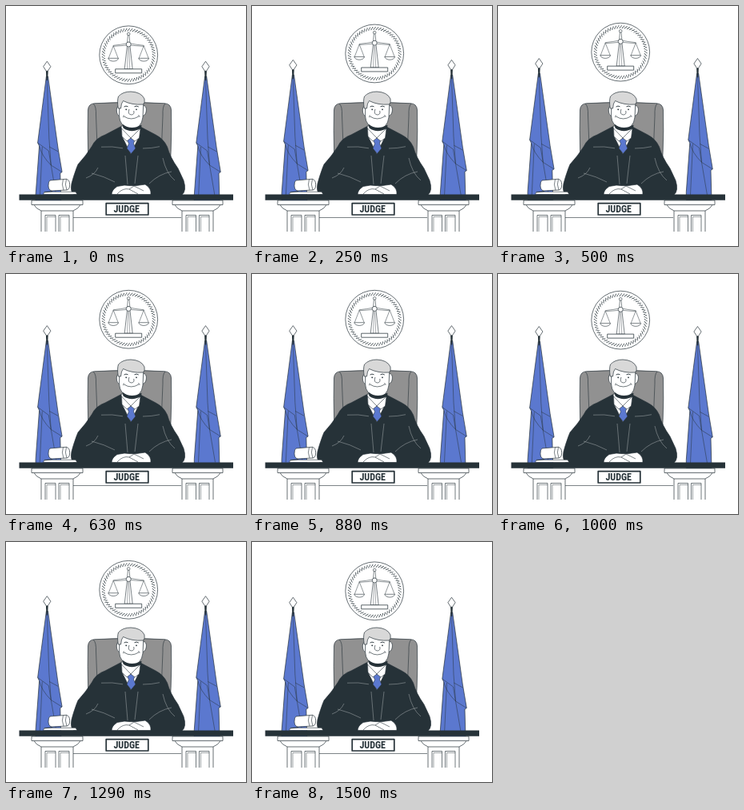
Animation, 300 px wide and 300 px high, one loop 1.54 s. Source, as an HTML page with a canvas:

```html
<!DOCTYPE html>
<html lang="en">
<head>
<meta charset="utf-8">
<title>Judge</title>
<style>
html, body { margin: 0; width: 100%; height: 100%; overflow: hidden; background: #fff; }
canvas { display: block; width: 100vw; height: 100vh; }
</style>
</head>
<body>
<canvas id="stage"></canvas>
<script>
const canvas = document.getElementById('stage');
const ctx = canvas.getContext('2d');
const LOOP = 1540, FPS = 24, CYCLE = 1.5, RISE = 5.5;
const INK = '#263238', BLUE = '#5b78cf', GREY = '#919191', HAIR = '#d8d8d8', WHITE = '#fff';

function shape(d, fill, stroke = INK, width = 0.7) {
  const path = new Path2D(d);
  if (fill) { ctx.fillStyle = fill; ctx.fill(path); }
  if (stroke) { ctx.strokeStyle = stroke; ctx.lineWidth = width; ctx.stroke(path); }
}
const line = (d, color, width) => shape(d, null, color, width);
const box = (x, y, w, h, fill = WHITE, stroke = INK, width = 0.7) =>
  shape(`M${x} ${y}h${w}v${h}h${-w}z`, fill, stroke, width);

function disc(x, y, r, fill, stroke = INK, width = 0.7) {
  ctx.beginPath();
  ctx.arc(x, y, r, 0, Math.PI * 2);
  if (fill) { ctx.fillStyle = fill; ctx.fill(); }
  if (stroke) { ctx.strokeStyle = stroke; ctx.lineWidth = width; ctx.stroke(); }
}

function at(x, y, draw) {
  ctx.save();
  ctx.translate(x, y);
  draw();
  ctx.restore();
}

function pan(x) {
  at(x, 0, () => {
    line('M0 -11.5L-6 4M0 -11.5L6 4', INK, 0.5);
    shape('M-6.5 4H6.5C5 9 -5 9 -6.5 4Z', WHITE, INK, 0.6);
  });
}

// Emblem, centred on its own origin
function emblem() {
  disc(0, 0, 36.4, WHITE);
  const beads = 60;
  for (let i = 0; i < beads; i++) {
    ctx.save();
    ctx.rotate(i * Math.PI * 2 / beads);
    line('M29.6 -1.2Q31 -1.2 31.5 0Q32 1.2 33.4 1.2', INK, 0.8);
    ctx.restore();
  }
  pan(-19);
  pan(19);
  shape('M-19 -12Q-9 -13 -2 -14.5H2Q9 -13 19 -12V-11Q9 -11.5 0 -12.5Q-9 -11.5 -19 -11Z', WHITE, INK, 0.5);
  shape('M-1.8 -11L-5 17.5H5L1.8 -11Z', WHITE, INK, 0.6);
  line('M-.6 -10L-1.6 17.5M.6 -10L1.6 17.5', INK, 0.4);
  box(-16.5, 17.5, 33, 5, WHITE, INK, 0.75);
  shape('M-.8 -25L-1.6 -16H1.6L.8 -25Z', WHITE, INK, 0.55);
  disc(0, -26.3, 1.8, WHITE, INK, 0.6);
  disc(0, -13.3, 3, WHITE, INK, 0.7);
}

// Flag with its pole at x = 0
function flag() {
  shape('M-.9 88L-11.7 171L-9.7 175L-14.2 236V246H17.5L16.5 209L18.8 207.5L13.8 178L1.2 88Z', BLUE);
  line('M0 92L2.5 165L5 199L18.6 207.5M-11.7 171L2 181L5 199M2.8 176L14 182'
    + 'M-9.7 175Q-7 187 5 199M5 199L12 240M-6 176L-9 240', INK, 0.5);
  shape('M-1.4 81H1.4L.8 93H-.8Z', INK, null);
  shape('M0 69.2L4.6 75.7L1 81.3H-1L-4.6 75.7Z', WHITE);
}

function chair() {
  shape('M106 238Q101 180 102.5 130Q103 122 111 121.7Q154 118.8 198 121.7Q206 122 206.5 130Q208 181 202 238Z', GREY);
  line('M109 122Q113 125 112.5 137L114 175M199 122Q195.5 125 196 137L194.5 175', INK, 0.6);
}

function head() {
  shape('M142 125C137 123.5 137 137 142.5 138ZM171 125C177 122.5 177 136.5 170.5 137.5Z', WHITE);
  shape('M142 117L141.5 137Q142 151 156 154.5Q169.5 153 171 139L172 118Q157 106 142 117Z', WHITE);
  shape('M140.2 128Q138.8 118 140.5 113Q146 107 156 107Q169 107.5 173 116Q174 121 171.5 123Q157 124 146.5 118.5Q144 121 143.5 128Z', HAIR);
  line('M147.5 126Q150 124.2 152.5 125.8M160.5 125.8Q163 124.2 165.8 126', INK, 0.9);
  disc(150.2, 129.3, 0.9, INK, null);
  disc(163, 129.3, 0.9, INK, null);
  line('M154 129Q151.5 135.5 156.8 136Q161 135.7 159.7 131M147.5 138Q156.5 144 166.2 137.8M147.3 136.5L146.6 139.2M165.6 136.2L167.2 138.8', INK, 0.65);
}

function judge() {
  shape('M143 151L124 161Q112 165 107 176Q100 187 90 198L88 203Q84 214 82 222Q80 232 85 236H220Q226 231 222 218L215 203Q205 189 201.5 176Q197 166 187 161L168 151Z', INK);
  shape('M144 150L145 163L156 185L167 162L168 150Z', WHITE);
  shape('M151 167L156 165L161 167L159.5 172L162 178L156.5 184.5L151 178L153.5 172Z', BLUE, INK, 0.6);
  shape('M144.5 153L156 165L168 153L166.5 165L161 169L156 165L151 169L145 163Z', WHITE, INK, 0.6);
  head();
  shape('M145.5 147.5Q156 156 169.5 148.5L169 152.5Q157 160 146.5 152.5Z', INK, null);
  line('M119 176.2Q133 175 146 177.8M171 178Q182 178 192 175.7M115 202Q111 211 100 215M196 190Q200 209 211 218'
    + 'M107 209Q123 213 136 220M207 207Q191 210 179 222M149 187L152 223M165 187L161 222', '#aab0b3', 0.5);
  shape('M132 235.7Q132 230 139 225.5L148 224Q157 225 163 224.5L174 223Q182 228 181 235.7Z', WHITE);
  line('M139 235Q146 227 154 229L165 235M154 229L160 225L172 231', INK, 0.6);
}

function gavel() {
  shape('M46.5 235.5L48 232.3H87L89 235.5Z', WHITE, INK, 0.6);
  line('M48 233L58 231.5', INK, 0.8);
  shape('M55 218L75.5 216.3Q79.8 217.5 79.6 223.5Q79.8 229.3 76 230L57 231Q53 230 53 224.5Q53 219 55 218Z', WHITE);
  line('M71.5 216.6Q69 223 72 230.2M75.5 216.3Q73 223 76 230', INK, 0.6);
}

function pillar(x, width) {
  const left = x + 12, right = x + width - 12;
  shape(`M${x + 3} 248.5Q${x + 5} 253 ${left} 256V282M${x + width - 3} 248.5Q${x + width - 5} 253 ${right} 256V282M${left} 256H${right}`, null);
  box(x, 243, width, 5.5);
  const middle = (left + right) / 2;
  for (const side of [left + 5, middle + 2]) {
    const w = middle - left - 7;
    line(`M${side} 282V261.5h${w}V282`, INK, 0.65);
    line(`M${side + 2} 282V263.5h${w - 2}`, INK, 0.45);
  }
}

function desk() {
  line('M84 264.5H219', INK, 0.6);
  pillar(32, 64);
  pillar(208, 63);
  box(16.5, 235.6, 267.5, 7.2, INK, null);
  box(125.2, 246.6, 52.6, 14.4, WHITE, INK, 1.7);
  ctx.fillStyle = INK;
  ctx.font = "bold extra-condensed 12px 'Roboto Condensed', 'Liberation Sans Narrow', 'Noto Sans Condensed', 'Roboto', sans-serif";
  ctx.textAlign = 'center';
  ctx.textBaseline = 'alphabetic';
  ctx.fillText('JUDGE', 150.6, 258.2);
}

// Linear rise and fall, stepped at the frame rate
function lift(ms) {
  const step = Math.floor((ms % LOOP + 4.9) * FPS / 1000);
  const phase = (Math.min(step / FPS, CYCLE) / CYCLE) % 1;
  return -RISE * (1 - Math.abs(1 - 2 * phase));
}

function resize() {
  const ratio = window.devicePixelRatio || 1;
  canvas.width = Math.round(innerWidth * ratio);
  canvas.height = Math.round(innerHeight * ratio);
}

function render(ms) {
  ctx.setTransform(1, 0, 0, 1, 0, 0);
  ctx.fillStyle = WHITE;
  ctx.fillRect(0, 0, canvas.width, canvas.height);
  ctx.setTransform(canvas.width / 300, 0, 0, canvas.height / 300, 0, 0);
  ctx.lineJoin = 'round';
  const dy = lift(ms);
  at(153.2, 61.3 + dy, emblem);
  for (const x of [51.3, 249.5]) at(x, dy, flag);
  chair();
  judge();
  gavel();
  desk();
}

let start;
function frame(now) {
  start ??= now;
  render(now - start);
  requestAnimationFrame(frame);
}

addEventListener('resize', resize);
resize();
render(0);
requestAnimationFrame(frame);
</script>
</body>
</html>
```
